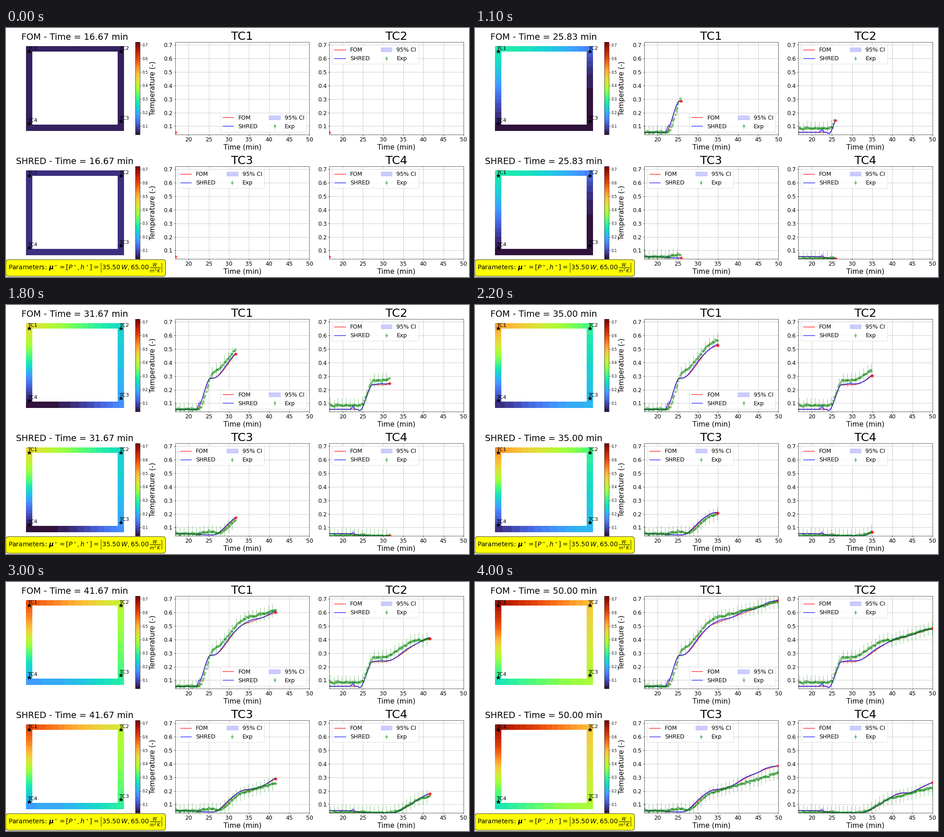
A matplotlib script that plays this animation: 1020x549 px, repeating every 4.1 s.

```python
import numpy as np
import matplotlib.pyplot as plt
from matplotlib.animation import FuncAnimation
from matplotlib.cm import ScalarMappable
from matplotlib.colors import Normalize

W, H, DPI = 1020, 549, 55.5
FRAMES, STEP = 41, 100
START, END = 50 / 3, 50.0
LOW, HIGH = 0.038, 0.7218
ROW, COL = 274, 339.6  # spacing of the panels, px

plt.rcParams["font.family"] = "DejaVu Sans"
rng = np.random.default_rng(4)
T = np.linspace(START, 58, 497)
EXP_T = np.arange(16.84, END, 0.25)


def bell(t, centre, width):
    return np.exp(-((t - centre) / width) ** 2)


def ramp(t, t0, t1, height):
    """Eased step of the given height between t0 and t1."""
    u = np.clip((t - t0) / (t1 - t0), 0, 1)
    return height * u * u * (3 - 2 * u)


def heating(t, base, *ramps, drift):
    """Eased ramps followed by a steady drift (start, slope)."""
    start, slope = drift
    steady = slope * np.logaddexp(0, 3 * (t - start)) / 3
    return base + steady + sum(ramp(t, *r) for r in ramps)


def estimate(fom, kick, gain):
    """Model curve with an early kick and a slow ripple above it."""
    ripple = np.where(T > 26.5, np.sin(np.pi * (T - 26.5) / 6) ** 2, 0)
    return fom + kick * bell(T, 22.5, 0.35) + gain * ripple


def measured(base, *ramps, drift):
    noise = rng.normal(0, 0.004, EXP_T.size)
    return heating(EXP_T, base, *ramps, drift=drift) + noise


FOM = [
    heating(T, .054, (22, 25.5, .231), (26, 34, .225), drift=(33.5, .011)),
    heating(T, .055, (23.4, 24.4, -.01), (24.2, 27.4, .19), (30, 41.5, .165),
            drift=(41, .009)),
    heating(T, .055, (18, 25, -.01), (26, 34, .16), (34.5, 47, .14),
            drift=(45, .0085)),
    heating(T, .055, (20, 28, -.019), (31.8, 43, .148), drift=(44.5, .0145)),
]
SHRED = [estimate(*args) for args in
         zip(FOM, (.028, .019, .007, .009), (.012, .009, .007, .003))]
EXP = [
    measured(.056, (22.4, 26.4, .275), (25.6, 34.8, .23), drift=(34, .0075)),
    measured(.085, (24.4, 27.8, .183), (29.5, 38.5, .125), drift=(39.5, .009)),
    measured(.053, (22.5, 25.5, .018), (25.5, 27, -.012), (27, 34, .132),
             drift=(34, .0092)),
    measured(.043, (32, 41, .112), drift=(41, .008)),
]
CI = 0.003 + 0.014 * bell(T, 22.6, 0.35)

fig = plt.figure(figsize=((W + 1e-6) / DPI, (H + 1e-6) / DPI), dpi=DPI)
norm = Normalize(LOW, HIGH)
cmap = plt.get_cmap("turbo", 50)
TICKS = np.arange(1, 8) / 10


def at(c, t):
    return np.interp(t, T, c)


def add_axes(x, width, dy):
    top, height = 31 + dy, 203.8
    return fig.add_axes([x / W, 1 - (top + height) / H, width / W, height / H])


class Loop:
    """Square loop coloured by temperature, with its colour bar."""

    N = 200
    U = (np.arange(N) + 0.5) / N

    def __init__(self, name, dy, curves, top_puff, left_puff, offset):
        self.name, self.curves, self.offset = name, curves, offset
        self.top_puff, self.left_puff = top_puff, left_puff
        self.ax = ax = add_axes(33.2, 236.6, dy)
        ax.set(xlim=(33.2, 269.8), ylim=(234.8, 31))
        ax.set_axis_off()
        self.title = ax.set_title("", fontsize=25)

        xs = np.linspace(44, 259.5, self.N + 1)
        ys = np.linspace(40, 227, self.N + 1)
        self.left = self.side([44, 57.5], ys)
        self.right = self.side([246, 259.5], ys)
        self.top = self.side(xs, [40, 52.5])
        self.bottom = self.side(xs, [213.5, 227])

        spots = [(51, 51.5), (252.5, 51.5), (252.5, 205), (51, 210.5)]
        for i, (x, y) in enumerate(spots, 1):
            ax.plot(x, y, "k*", ms=12)
            ax.text(x - 3.5, y - 3.5, f"TC{i}", fontsize=15)

        bar = fig.colorbar(ScalarMappable(norm, cmap), ticks=TICKS,
                           cax=add_axes(285, 10, dy))
        bar.set_label("Temperature (-)", fontsize=20)

    def side(self, x, y):
        z = np.zeros((len(y) - 1, len(x) - 1))
        return self.ax.pcolormesh(x, y, z, cmap=cmap, norm=norm)

    def flow(self, i, t, delay):
        """Temperature carried from probe i to the next one."""
        u, (a, b) = self.U, self.curves[i:i + 2]
        return (1 - u) * at(a, t - u * delay) + u * at(b, t + (1 - u) * delay)

    def update(self, t):
        u, puff = self.U, bell(t, 22.5, 0.7)
        base = self.offset * bell(t, START, 2)
        top_puff = self.top_puff * puff
        left_puff = self.left_puff * puff * np.sin(np.pi * np.minimum(u, .6))
        hot, cold = at(self.curves[0], t), at(self.curves[3], t)

        top = self.flow(0, t, 2.2) + base + top_puff
        right = self.flow(1, t, 3.0) + base + top_puff * (1 - u)
        bottom = self.flow(2, t, 6.5) + base
        rise = u - 0.06 * np.sin(2 * np.pi * u)
        left = cold + (hot - cold) * rise + base + left_puff

        self.top.set_array(top[None, :])
        self.right.set_array(right[:, None])
        self.bottom.set_array(bottom[None, ::-1])
        self.left.set_array(left[::-1, None])
        self.title.set_text(f"{self.name} - Time = {t:.2f} min")


class Probe:
    """Time history at one thermocouple."""

    ERR, EVERY = 0.05, 4

    def __init__(self, i):
        self.fom, self.shred, self.exp = FOM[i], SHRED[i], EXP[i]
        ax = add_axes(372.6 + COL * (i % 2), 295.8, ROW * (i // 2))
        ax.grid(True)
        ax.set_title(f"TC{i + 1}", fontsize=33)
        ax.set_xlabel("Time (min)", fontsize=20, labelpad=2.5)
        ax.tick_params(labelsize=16)
        self.red, = ax.plot(T, self.fom, "r", label="FOM")
        self.blue, = ax.plot(T, self.shred, "b", label="SHRED")
        self.band = ax.fill_between(T, self.shred - CI, self.shred + CI,
                                    color="b", alpha=0.2, label="95% CI")
        bars = ax.errorbar(EXP_T, self.exp, yerr=self.ERR, fmt="o", color="g",
                           ms=6, alpha=0.4, errorevery=self.EVERY, label="Exp")
        self.dots, _, (self.bars,) = bars
        self.star, = ax.plot([], [], "r*", ms=10, zorder=6)
        ax.legend(handles=[self.red, self.blue, self.band, bars], ncol=2,
                  fontsize=16, loc="upper left" if i else "lower right")
        ax.set(xlim=(START, END), ylim=(LOW, HIGH),
               xticks=range(20, 51, 5), yticks=TICKS)

    def update(self, t):
        seen = T <= t + 1e-6
        x, y, ci = T[seen], self.shred[seen], CI[seen]
        self.red.set_data(x, self.fom[seen])
        self.blue.set_data(x, y)
        edge = np.r_[y - ci, (y + ci)[::-1]]
        self.band.set_verts([np.column_stack([np.r_[x, x[::-1]], edge])])

        n = np.searchsorted(EXP_T, t)
        ex, ey = EXP_T[:n], self.exp[:n]
        self.dots.set_data(ex, ey)
        self.bars.set_segments([[(a, b - self.ERR), (a, b + self.ERR)]
                                for a, b in zip(ex[::self.EVERY],
                                                ey[::self.EVERY])])
        self.star.set_data([t], [at(self.fom, t)])


parts = [Loop("FOM", 0, FOM, 0, 0.035, 0),
         Loop("SHRED", ROW, SHRED, 0.03, 0.03, 0.014)]
parts += [Probe(i) for i in range(4)]

fig.text(175.6 / W, 1 - 529 / H,
         r"Parameters: $\boldsymbol{\mu}^\star = [P^\star, h^\star] = "
         r"\left[35.50\,W, 65.00\,\frac{W}{m^2\,K}\right]$",
         fontsize=18, ha="center", va="center",
         bbox=dict(boxstyle="round,pad=0.4", fc="yellow", ec="black"))


def update(k):
    t = START + (END - START) * k / (FRAMES - 1)
    for part in parts:
        part.update(t)
    return []


anim = FuncAnimation(fig, update, frames=FRAMES, interval=STEP, repeat=True,
                     repeat_delay=0)
plt.show()
```
